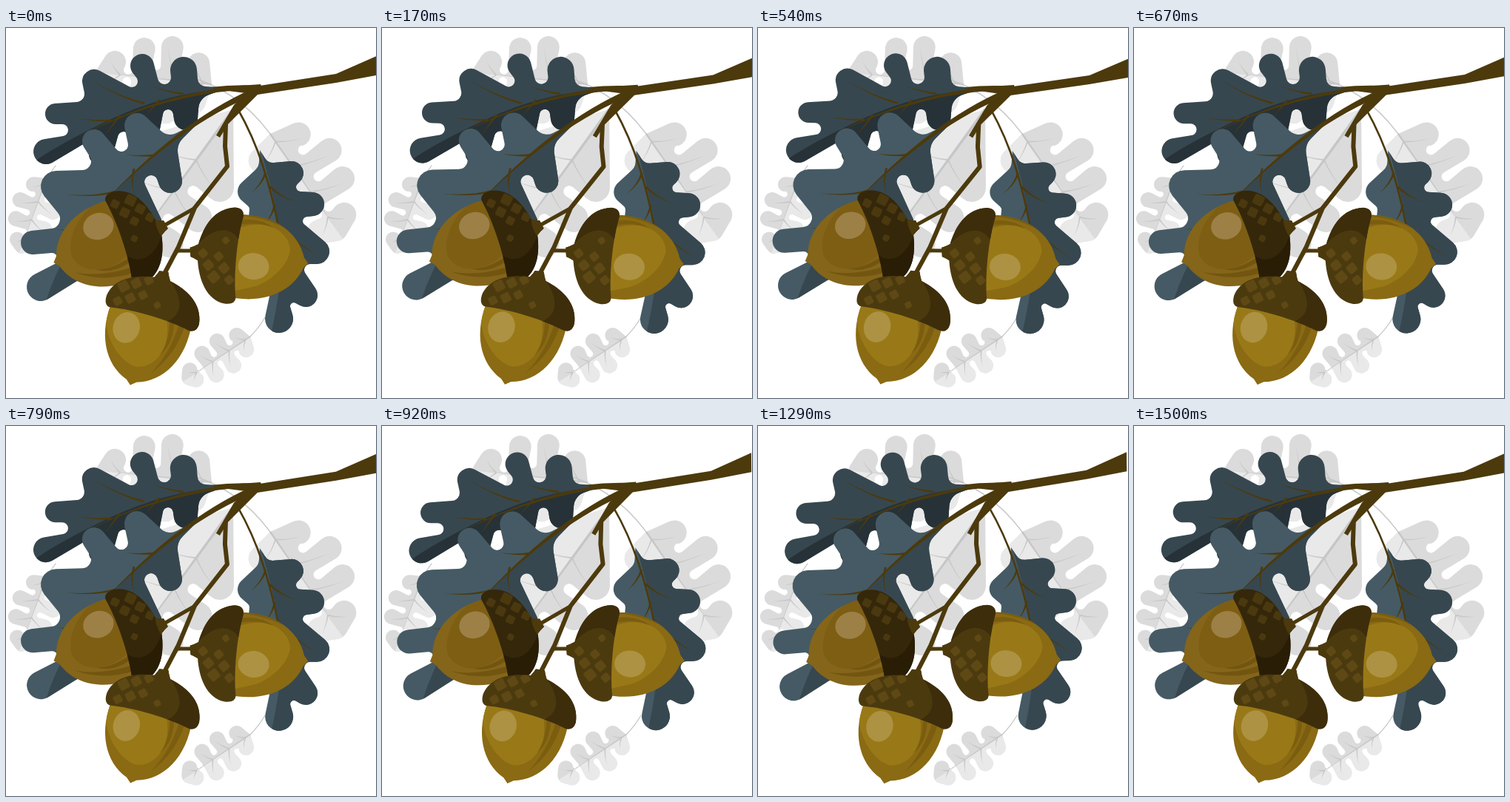
An HTML page for the animation above (1540 ms loop, 500 by 500 pixels).

```html
<!DOCTYPE html>
<html lang="en">
<head>
<meta charset="utf-8">
<title>Oak branch</title>
<style>
html, body { margin: 0; width: 100%; height: 100%; overflow: hidden; background: #fff; }
svg { display: block; width: 100%; height: 100%; }
</style>
</head>
<body>
<svg viewBox="0 0 500 500" xmlns="http://www.w3.org/2000/svg">
  <defs id="defs"></defs>
  <g id="back"></g>
  <g id="sway"></g>
</svg>
<script>
const NS = 'http://www.w3.org/2000/svg';
const [defs, back, sway] = ['defs', 'back', 'sway'].map(id => document.getElementById(id));
const BARK = '#4c3a0d', SLATE = '#37474f', LIGHT = '#455a64', NIGHT = '#263238';
const PALE = '#dbdbdb', PALER = '#e9e9e9', RIB = '#c6c6c6';
let clips = 0;

function add(parent, tag, attrs) {
  const el = document.createElementNS(NS, tag);
  for (const k in attrs) el.setAttribute(k, attrs[k]);
  return parent.appendChild(el);
}
const group = (g, x, y, turn) => add(g, 'g', { transform: `translate(${x} ${y}) rotate(${turn})` });
const path = (g, d, fill) => add(g, 'path', { d, fill });
const line = (g, d, stroke, width) => add(g, 'path',
  { d, fill: 'none', stroke, 'stroke-width': width, 'stroke-linecap': 'round', 'stroke-linejoin': 'round' });

// Fills an outline and returns a group clipped to it
function shape(g, d, fill) {
  const id = 'clip' + clips++;
  add(add(defs, 'clipPath', { id }), 'path', { d });
  path(g, d, fill);
  return add(g, 'g', { 'clip-path': `url(#${id})` });
}

// Clockwise belt around discs [x, y, r]; it passes inside a disc with negative r
function belt(discs) {
  const n = discs.length, TAU = 2 * Math.PI;
  const normals = discs.map(([x, y, r], i) => {
    const [x2, y2, r2] = discs[(i + 1) % n];
    const ratio = (r - r2) / Math.hypot(x2 - x, y2 - y);
    return Math.atan2(y2 - y, x2 - x) - Math.acos(Math.max(-1, Math.min(1, ratio)));
  });
  const on = ([x, y, r], a) => `${(x + r * Math.cos(a)).toFixed(2)},${(y + r * Math.sin(a)).toFixed(2)}`;
  return discs.map((disc, i) => {
    const from = normals[(i + n - 1) % n], to = normals[i], side = disc[2] < 0 ? -1 : 1;
    const turn = (((to - from) * side + .8) % TAU + TAU) % TAU - .8;
    const r = Math.abs(disc[2]), sweep = turn * side > 0 ? 1 : 0;
    return `${i ? 'L' : 'M'}${on(disc, from)}A${r},${r} 0 ${turn > Math.PI ? 1 : 0} ${sweep} ${on(disc, to)}`;
  }).join('') + 'Z';
}
const discs = text => text.trim().split(/\s+/).map(s => s.split(',').map(Number));

// Vein that narrows from width w to a point
function vein(g, [x0, y0, cx, cy, x1, y1], w, fill) {
  const len = Math.hypot(x1 - x0, y1 - y0);
  const nx = (y0 - y1) / len * w / 2, ny = (x1 - x0) / len * w / 2;
  path(g, `M${x0 + nx},${y0 + ny}Q${cx + nx * .6},${cy + ny * .6} ${x1},${y1}` +
    `Q${cx - nx * .6},${cy - ny * .6} ${x0 - nx},${y0 - ny}Z`, fill);
}

// Pale leaf along a rib from base to tip: four lobes on each side
function paleLeaf(x0, y0, x1, y1, wide, lit, first = .13, round = .095) {
  const len = Math.hypot(x1 - x0, y1 - y0), r = len * round;
  const g = group(back, x0, y0, Math.atan2(y1 - y0, x1 - x0) * 180 / Math.PI);
  const edge = [];
  for (let i = 0; i < 4; i++) {
    const t = first + (.85 - first) * i / 3;
    const x = t * len, y = wide * Math.sin(Math.PI * t ** .8);
    if (i) edge.push([(x + edge.at(-1)[0]) / 2, y * .45, -r * .4]);
    edge.push([x, y, r]);
  }
  const upper = edge.map(([x, y, s]) => [x, -y, s]);
  const inner = shape(g, belt([[0, 0, 0], ...upper, [len - r, 0, r], ...edge.slice().reverse()]), PALE);
  add(inner, 'rect', { x: 0, y: lit < 0 ? -200 : 0, width: len, height: 200, fill: PALER });
  vein(g, [0, 0, len / 2, 0, len * .95, 0], len * .014, RIB);
  for (const [x, y, s] of [...edge, ...upper])
    if (s > 0) vein(g, [x - r * .6, 0, x, y * .4, x + r * .4, y], 1.8, RIB);
}

function paleLeaves() {
  paleLeaf(278, 76, 122, 60, 45, -1);
  paleLeaf(357, 143, 455, 285, 54, 1);
  paleLeaf(307, 110, 135, 345, 50, 1, .33, .065);
  paleLeaf(55, 203, 18, 304, 24, -1);
  paleLeaf(330, 417, 239, 478, 20, -1);
  line(back, 'M240,64Q310,80 357,143M67,186L55,203M350,391Q342,405 330,417', RIB, 1.3);
}

// Dark leaf: outline discs, the part on one side of the rib, and side veins
function darkLeaf(outline, base, half, shade, ribs) {
  path(shape(sway, belt(discs(outline)), base), half, shade);
  for (const rib of ribs) vein(sway, rib, 3, BARK);
}

function darkLeaves() {
  darkLeaf(`54,167,17 76,138,-8 67,116,14 95,89,-11 119,72,16 170,72,-8 184,51,16 214,67,-9
    240,57,18 270,68,-11 300,81,0 281,110,-21 243,122,16 219,117,-7 190,150,15 159,148,-8
    128,170,16 106,163,-6`, SLATE, 'M300,82Q215,88 140,124T35,183V240H300Z', NIGHT,
  [[187, 102, 154, 94, 118, 72], [240, 89, 220, 87, 198, 79], [142, 125, 122, 126, 95, 122],
    [154, 118, 145, 130, 133, 146], [207, 97, 200, 106, 188, 119]]);
  vein(sway, [345, 79, 220, 83, 98, 147], 6, BARK);

  darkLeaf(`47,350,19 62,312,-8 36,290,16 60,258,-13 68,214,21 103,180,-12 119,153,16 156,158,-9
    177,132,17 222,126,-18 262,126,0 256,166,-24 222,207,16 196,208,-9 205,260,5 170,330,5
    104,358,-18`, LIGHT, 'M275,115Q205,160 140,228T52,376H240L300,130Z', SLATE,
  [[200, 172, 182, 174, 161, 171], [148, 221, 120, 229, 82, 225],
    [173, 190, 168, 206, 173, 225], [120, 262, 95, 276, 66, 272]]);

  darkLeaf(`343,165,0 361,169,-13 386,196,16 398,215,-6 414,238,16 407,261,-6 420,302,17
    411,327,-8 405,361,16 389,376,-5 369,393,19 348,362,-8 335,330,5 330,275,4 323,245,-6
    329,221,16 326,180,-16`, LIGHT, 'M343,160Q362,225 370,275T358,414H450V160Z', SLATE,
  [[351, 195, 346, 211, 331, 223], [356, 214, 372, 229, 392, 235],
    [363, 238, 361, 252, 350, 265], [370, 270, 394, 291, 422, 308]]);
}

function branch() {
  path(sway, 'M500.5,38L446,62L343,78Q310,76 276,80L284,83L340,90L446,74L500.5,64Z', BARK);
  path(sway, 'M330,82L308,104L284,145L289,148L300,130L342,88Z', BARK);
  vein(sway, [335, 86, 235, 128, 128, 240], 9, BARK);
  line(sway, 'M313,109Q334,146 347,186T368,268', BARK, 2.6);
  line(sway, 'M297,130L296,160L299,187L255,243L233,296L214,332', BARK, 6);
  line(sway, 'M254,244L217,265M232,301H255', BARK, 5);
}

// Acorn hanging from its stalk, drawn along the x axis; slide moves its markings sideways
function acorn(x, y, turn, slide, color) {
  const g = group(sway, x, y, turn);
  const move = { transform: `translate(0 ${slide})` };

  const nut = shape(g, 'M54,55C104,62 142,40 153,7L159,0L153,-7C142,-42 104,-63 54,-56Z', color.nut);
  const marks = add(nut, 'g', move);
  path(marks, 'M40,-24L58,-21C100,-42 130,-22 133,0C133,22 110,46 90,54L40,70Z', color.belly);
  path(marks, 'M62,-48Q104,-47 136,-22Q106,-39 62,-40ZM62,-27Q90,-34 108,-27Q90,-40 62,-33Z', color.groove);
  add(marks, 'ellipse', { cx: 86, cy: 27, rx: 21, ry: 18, fill: color.shine });

  const cap = shape(g, 'M0,6Q4,7 10,10C14,35 26,62 52,65Q66,65 66,56C60,25 60,-25 66,-55' +
    'Q66,-66 54,-66C26,-62 14,-38 9,-12Q3,-8 -2,-6Z', color.cap);
  path(cap, 'M8,-11C22,-30 44,-44 62,-24H80V-80H0Z', color.dark);
  path(cap, 'M-4,-8L10,-13Q14,0 10,12L-4,8Z', BARK);
  const grid = add(cap, 'g', move);
  const scale = (row, i) => {
    const size = 14 - 1.5 * Math.abs(i) - 1.5 * row;
    const cx = 33.6 + 12.8 * row - 8.7 * i, cy = 46.4 - 13.2 * row - 15.2 * i;
    add(grid, 'rect', { x: cx - size / 2, y: cy - size / 2, width: size, height: size, rx: 2.5,
      fill: color.scale, transform: `rotate(45 ${cx} ${cy})` });
  };
  for (let row = 0; row < 2; row++)
    for (let i = 0; i < 3; i++) scale(row, i - row);
  scale(2, 1.6);
}

function acorns() {
  const warm = { nut: '#8a6a13', belly: '#997917', groove: '#7b5d10', shine: '#ad9243',
    cap: '#4c3a0f', dark: '#3d2d0b', scale: '#5e4915' };
  const shaded = { nut: '#84651a', belly: '#7d5e13', groove: '#725510', shine: '#9c8046',
    cap: '#35270a', dark: '#291d06', scale: '#4a380f' };
  acorn(215, 266, 161.3, 0, shaded);
  acorn(250, 303, 5.4, -16, warm);
  acorn(213, 330, 106.5, 0, warm);
}

paleLeaves();
darkLeaves();
branch();
acorns();

const LOOP = 1540;
// 0 -> 1 -> -1 -> 0 degrees at constant speed
function tilt(p) {
  return p < .25 ? p * 4 : p < .75 ? 2 - p * 4 : p * 4 - 4;
}
function draw(time) {
  sway.setAttribute('transform', `rotate(${tilt(time % LOOP / LOOP).toFixed(4)} 250 250)`);
}
const start = performance.now();
function tick() {
  draw(performance.now() - start);
  requestAnimationFrame(tick);
}
draw(0);
requestAnimationFrame(tick);
</script>
</body>
</html>
```
